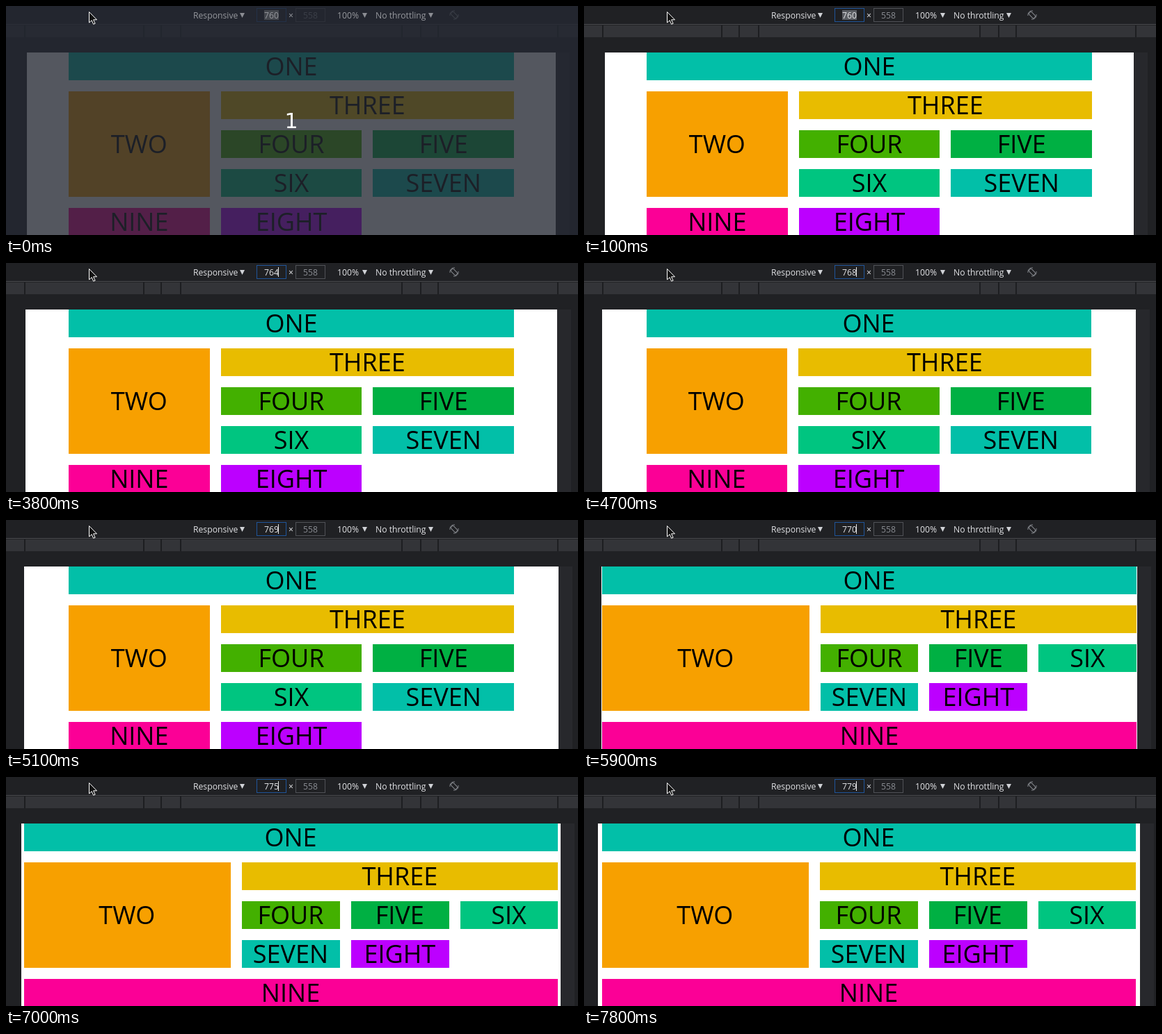
An HTML page that plays this animation: 822x330 px, repeating every 8 s.

```html
<!DOCTYPE html>
<html lang="en">
<head>
<meta charset="utf-8">
<title>Responsive grid</title>
<style>
  html, body { margin: 0; width: 822px; height: 330px; overflow: hidden; background: #202124; }
  svg { display: block; }
  .cell { font: 36px "Open Sans", "Noto Sans", sans-serif; text-anchor: middle; }
  .bar { font: 12.2px "Open Sans", "Noto Sans", sans-serif; fill: #e2e3e6; }
  .count { font: 30px "DejaVu Sans", sans-serif; text-anchor: middle; fill: #fff; }
</style>
</head>
<body>
<svg id="stage" width="822" height="330" viewBox="0 0 822 330"></svg>
<script>
const LOOP = 8000, MID = 410, TOP = 67, GAP = 16, ROW = 40;
const stage = document.getElementById('stage');

// [start ms, number in the width field, rendered page width]
const steps = [
  [0, 760, 760], [3100, 761, 761], [3300, 763, 762], [3600, 763, 763],
  [3800, 764, 764], [4100, 765, 765], [4400, 767, 767], [4700, 768, 767],
  [4900, 768, 768], [5100, 769, 768], [5200, 769, 769], [5900, 770, 770],
  [6500, 771, 771], [6700, 772, 772], [6900, 773, 773], [7000, 775, 775],
  [7300, 776, 776], [7400, 777, 777], [7700, 778, 778], [7800, 779, 779]
];

// name, colour, then [column, end column, row] for the narrow and wide grid
const cells = [
  ['ONE', '#02bfa8', [0, 3, 0], [0, 5, 0]],
  ['TWO', '#f7a000', [0, 1, 1], [0, 2, 1]],
  ['THREE', '#e8bc00', [1, 3, 1], [2, 5, 1]],
  ['FOUR', '#43b000', [1, 2, 2], [2, 3, 2]],
  ['FIVE', '#00b043', [2, 3, 2], [3, 4, 2]],
  ['SIX', '#00c580', [1, 2, 3], [4, 5, 2]],
  ['SEVEN', '#02bfa8', [2, 3, 3], [2, 3, 3]],
  ['EIGHT', '#bc00ff', [1, 2, 4], [3, 4, 3]],
  ['NINE', '#fb0096', [0, 1, 4], [0, 5, 4]]
];

const rect = (x, y, w, h, fill, extra = '') =>
  `<rect x="${x}" y="${y}" width="${w}" height="${h}" fill="${fill}" ${extra}/>`;
const text = (x, y, cls, str, extra = '') =>
  `<text x="${x}" y="${y}" class="${cls}" ${extra}>${str}</text>`;
const triangle = x => `<path d="M${x} 10h7l-3.5 7z" fill="#d0d2d6"/>`;

function grid(width) {
  const wide = width > 768, odd = width % 2;
  const total = wide ? 768 : 640, cols = wide ? 5 : 3;
  const unit = (total + GAP) / cols, start = MID - total / 2;
  return cells.map(([name, colour, narrowAt, wideAt]) => {
    const [from, to, row] = wide ? wideAt : narrowAt;
    const a = start + from * unit, b = start + to * unit - GAP;
    const left = Math.round(a - odd / 2), right = Math.ceil(b - odd / 2 - .5);
    const y = TOP + row * (ROW + GAP), h = name === 'TWO' ? 3 * ROW + 2 * GAP : ROW;
    return rect(left, y, right - left, h, colour) +
      text((a + b) / 2 - odd, y + h / 2 + 13, 'cell', name);
  }).join('');
}

function page(width) {
  const left = Math.floor(MID - width / 2);
  return rect(left + width, TOP, 20, 263, '#27282c') +
    rect(left, TOP, width, 263, '#fff') + grid(width);
}

function ruler() {
  const marks = [26, 197, 222, 250, 568, 595, 620, 792];
  return rect(0, 26, 822, 1, '#4a4b4f') + rect(0, 28, 822, 17, '#333438') +
    marks.map(x => rect(x, 28, 2, 17, '#1d1e21')).join('');
}

function fields() {
  return rect(360.5, 3.5, 42, 19, '#1f2023', 'stroke="#1f5499"') +
    rect(416.5, 3.5, 42, 19, '#202124', 'stroke="#505257"') +
    text(427, 18, 'bar', '558', 'style="fill:#8b8e94"');
}

function labels(value, selected) {
  return (selected ? rect(371, 6, 21, 14, '#5a5d62') : rect(391, 6, 1, 14, '#e8e8e8')) +
    text(371, 18, 'bar', value) + text(269, 18, 'bar', 'Responsive') + triangle(336) +
    text(406, 18, 'bar', '×') + text(476, 18, 'bar', '100%') + triangle(512) +
    text(531, 18, 'bar', 'No throttling') + triangle(607);
}

const rotateIcon = `<g fill="none" stroke="#85888d" transform="translate(644 13)">
  <rect x="-2.5" y="-5" width="5" height="10" rx="1" transform="rotate(-45)"/>
  <path d="M-6 1A6 6 0 0 1 1-6M6-1A6 6 0 0 1-1 6"/></g>`;
const pointer = `<path d="M119.5 8.5v15.5l3.6-3.3 2.6 5.6 2.4-1.1-2.5-5.4h4.9z"
  fill="#111" stroke="#fff"/>`;

function draw(value, width, dim) {
  const veil = dim ? rect(0, 0, 822, 330, '#242832', 'opacity=".78"') : '';
  const count = dim ? text(MID, 176, 'count', '1') : '';
  stage.innerHTML = rect(0, 0, 822, 330, '#202124') + ruler() + page(width) +
    fields() + rotateIcon + veil +
    `<g opacity="${dim ? .6 : 1}">${labels(value, value === 760)}</g>` + count + pointer;
}

let shown = '';
function frame() {
  const t = performance.now() % LOOP;
  const [, value, width] = steps.findLast(s => s[0] <= t);
  const dim = t < 100, key = [value, width, dim].join();
  if (key !== shown) draw(value, width, dim);
  shown = key;
  requestAnimationFrame(frame);
}
frame();
</script>
</body>
</html>
```
